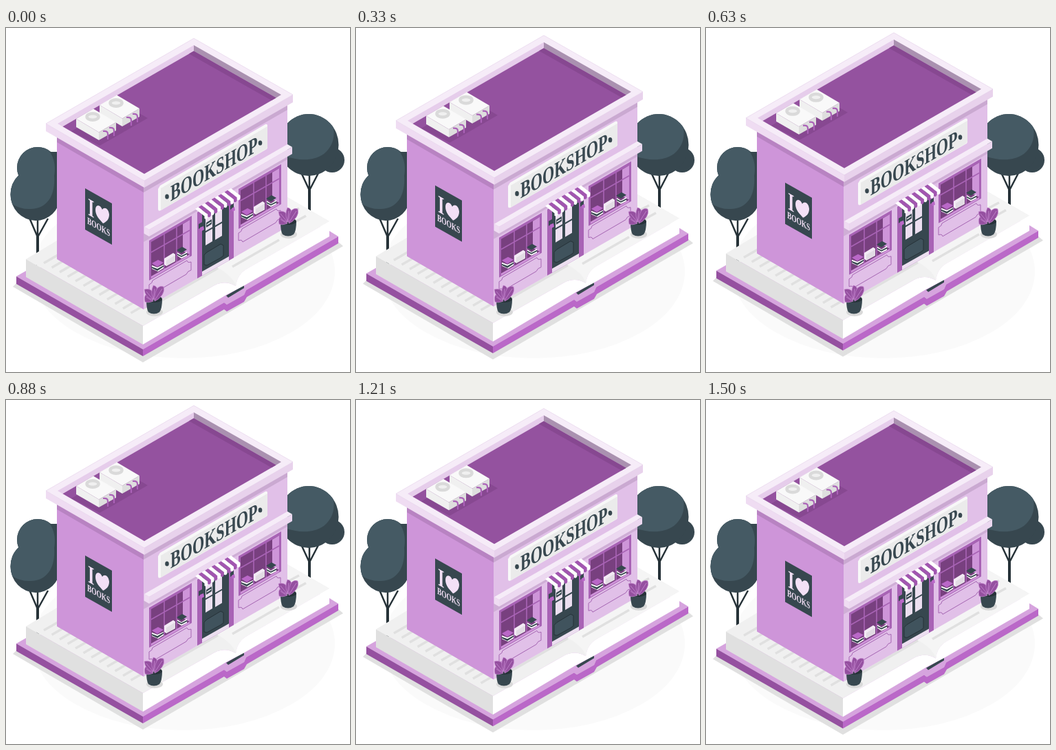
An HTML page that plays this animation: 500x500 px, repeating every 1.54 s.

```html
<!DOCTYPE html>
<html lang="en">
<head>
<meta charset="utf-8">
<title>Bookshop</title>
<style>
  html, body { margin: 0; width: 100%; height: 100%; overflow: hidden; background: #fff; }
  svg { display: block; width: 100%; height: 100%; }
  text { font-family: "Liberation Serif", serif; font-weight: bold; }
  .dark { fill: #37474f; }
  .leafy { fill: #455a64; }
  .branch { fill: none; stroke: #263238; stroke-width: 2.5; }
  .trunk { stroke: #263238; stroke-width: 4; }
  .line { fill: none; stroke: #a565b2; stroke-width: 1; }
</style>
</head>
<body>
<svg viewBox="0 0 500 500">
  <defs>
    <clipPath id="leftCrown">
      <circle cx="46" cy="203" r="30"/>
      <ellipse cx="43" cy="242" rx="36.500" ry="38"/>
      <path d="M60 180H80V245H60Z"/>
    </clipPath>
    <clipPath id="rightCrown"><ellipse cx="440" cy="170" rx="43.500" ry="45"/></clipPath>
    <g id="plant">
      <ellipse cx="216" cy="413" rx="12" ry="6" fill="#d9d9d9"/>
      <path class="dark" d="M204 394Q204 409 207 413Q215 418 223 413Q227 408 227 394Z"/>
      <ellipse cx="215.500" cy="394" rx="11.500" ry="5" fill="#263238"/>
      <g fill="#9550a0" stroke="#ce93d8" stroke-width=".6">
        <path d="M214 397Q206 400 202 398Q200 390 204 387Q212 388 214 397Z"/>
        <path d="M214 395Q202 392 201 380Q208 378 212 382Q215 388 214 395Z"/>
        <path d="M215 395Q209 385 214 374Q221 375 220 384Q219 391 215 395Z"/>
        <path d="M216 397Q215 386 220 378Q224 374 229 376Q231 382 227 388Q222 395 216 397Z"/>
      </g>
      <path d="M204 383L214 395L216 379M216 396L227 379M204 391L213 397" fill="none" stroke="#ce93d8" stroke-width=".7"/>
    </g>
    <g id="window">
      <path d="M208 309L270 273V331L208 367Z" fill="#a863b5"/>
      <path d="M211 311L267 279V329L211 361Z" fill="#78407f"/>
      <path d="M257 285L267 279V329L257 324Z" fill="#ce95d9"/>
      <path d="M230 299V350M248 289V340M211 326L267 294" fill="none" stroke="#a863b5" stroke-width="1.600"/>
      <path d="M211 361L267 329V332L211 364Z" fill="#ce93d8"/>
      <path d="M212 350L221 354L229 349V344L220 348L212 345Z" fill="#fff"/>
      <path d="M212 342L221 337L229 341L220 347Z" fill="#ba68c8"/>
      <path class="dark" d="M212 347L220 350L229 345V347L220 353L212 349Z"/>
      <path d="M230 335L243 327L246 329V339L233 346L230 344Z" fill="#f3eaf5"/>
      <path d="M233 338L246 330V339L233 346Z" fill="#e2dbe4"/>
      <path d="M249 326L255 330L263 325V331L255 335L249 331Z" fill="#fff"/>
      <path class="dark" d="M248 323L256 318L263 322L255 327ZM249 328L255 331L263 327V329L255 333L249 330Z"/>
      <path class="line" d="M213 367L263 338Q264 342 269 340V352Q264 353 262 358L214 386Q213 382 208 384V373Q213 371 213 367Z"/>
    </g>
    <g id="unit">
      <path d="M102 132L127 117.500L160 137L135 151.500Z" fill="#f9f9f9"/>
      <path d="M102 132L135 151.500V163L102 144Z" fill="#f0f0f0"/>
      <path d="M135 151.500L160 137V149L135 163Z" fill="#dedede"/>
      <ellipse cx="126" cy="129" rx="8.500" ry="4.800" fill="#f0f0f0" stroke="#dadada" stroke-width="4.500"/>
      <path d="M141 150Q148 149 148 154V162M150 145Q157 144 157 149V157" fill="none" stroke="#ab62b8" stroke-width="2.200"/>
    </g>
  </defs>

  <ellipse cx="258" cy="354" rx="220" ry="126" fill="#fafafa"/>

  <g id="trees">
    <path class="branch" d="M34 276L46 304L61 277M46 276V302"/>
    <path class="trunk" d="M46 300V345"/>
    <g clip-path="url(#leftCrown)">
      <path class="dark" d="M0 170H85V285H0Z"/>
      <path class="leafy" d="M0 170H54C69 182 73 197 70 215C72 240 62 263 36 263Q22 264 9 256H0Z"/>
    </g>
    <path class="branch" d="M428 208L441 236L455 209M441 210V236"/>
    <path class="trunk" d="M441 232V275"/>
    <circle class="dark" cx="474" cy="192" r="18"/>
    <g clip-path="url(#rightCrown)">
      <path class="dark" d="M390 120H490V220H390Z"/>
      <path class="leafy" d="M390 120H468C482 150 478 170 462 183C446 194 425 193 405 186H390Z"/>
    </g>
  </g>

  <g id="shop">
    <!-- open book -->
    <path d="M10 376L199 486L490 317L483 311L199 470L15 371Z" fill="#e0e0e0"/>
    <path d="M15 361L29 353L409 265L470 295L483 303L349 381L346 388L321 402L317 399L199 467Z" fill="#d6a4de"/>
    <path d="M15 361L199 467V477L15 372Z" fill="#9550a0"/>
    <path d="M199 467L317 399L321 402L346 388L349 381L483 303V313L350 391L346 398L321 412L317 409L199 477Z" fill="#ba68c8"/>
    <path class="dark" d="M320 389L346 374V378L323 392Z"/>
    <path d="M29 336L74 309L409 246L470 281L350 350Q336 358 334 375Q319 366 303 374L199 433Z" fill="#f0f0f0"/>
    <path d="M302 345L409 246L470 281L350 350Q336 358 334 375Q330 360 302 345Z" fill="#f5f5f5"/>
    <path d="M29 336L199 433V460L29 362Z" fill="#e0e0e0"/>
    <path d="M199 433L303 374Q319 366 334 375Q336 358 350 350L470 281V303L345 375L320 388L199 460Z" fill="#fff"/>
    <path id="lines" fill="none" stroke="#e0e0e0" stroke-width="3.500"/>

    <!-- walls -->
    <path d="M74 150L200 222V409L74 336Z" fill="#ce95d9"/>
    <path d="M200 222L409 102V289L200 409Z" fill="#e1c0e8"/>
    <path d="M74 158L200 231V239L74 166Z" fill="#b883c2"/>
    <path d="M200 231L409 111V119L200 239Z" fill="#caa9d1"/>

    <!-- roof -->
    <path d="M58 139L201 222V232L58 150Z" fill="#efdcf2"/>
    <path d="M201 222L417 97V108L201 232Z" fill="#e8d2ec"/>
    <path d="M58 139L273 15L417 97L201 222Z" fill="#f6ecf8" stroke="#dfc7e4" stroke-width=".5"/>
    <path d="M75 139L273 25V33.500L82.400 143.300Z" fill="#e6cdeb"/>
    <path d="M273 25L400 97L392.600 101.500L273 33.500Z" fill="#aa91b0"/>
    <path d="M82.400 143.300L273 33.500L392.600 101.500L201 212Z" fill="#94529f"/>
    <path d="M273 33.500L392.600 101.500L386 105.300L266 37.500Z" fill="#874891"/>
    <path d="M95 150L120 136L180 116L206 131L154 161L136 171Z" fill="#874891"/>
    <use href="#unit" x="34" y="-20"/>
    <use href="#unit"/>

    <!-- poster -->
    <path class="dark" d="M115 233L154 255V315L115 293Z"/>
    <g fill="#f3e0f6">
      <text transform="matrix(.67 .387 0 1 119 271)" font-size="36">I</text>
      <text transform="matrix(.67 .387 0 1 118 284)" font-size="14">BOOKS</text>
      <path d="M140 264C137 256 130 256 130 264C130 273 136 278 141 284C146 282 150 278 150 271C149 261 142 260 140 264Z"/>
    </g>

    <!-- sign -->
    <path d="M224 229L377 140Q380 139 380 142V174L379 176L225 265Q221 267 221 263V234Z" fill="#f8f8f8"/>
    <path d="M225 233L380 143V173L378 176L225 265Z" fill="#ebebeb"/>
    <text class="dark" transform="matrix(.67 -.387 0 1 239 252)" font-size="33">BOOKSHOP</text>
    <ellipse class="dark" cx="234" cy="245" rx="2.800" ry="3.600"/>
    <ellipse class="dark" cx="369.500" cy="167" rx="2.800" ry="3.600"/>

    <!-- ledge -->
    <path d="M200 299L409 180V191L200 311Z" fill="#cfaed6"/>
    <path d="M201 289L409 169L416 173L208 293Z" fill="#f6ecf8"/>
    <path d="M201 289L208 293V303L201 299Z" fill="#efdcf2"/>
    <path d="M208 293L416 173V183L208 303Z" fill="#ecd8f0"/>

    <use href="#window"/>
    <use href="#window" x="130" y="-75"/>

    <!-- door -->
    <path d="M278 268L331 238V334L278 364Z" fill="#a863b5"/>
    <path d="M285 262L324 240V338L285 360Z" fill="#ecdff0"/>
    <path class="dark" d="M285 262L324 240V332L285 354Z"/>
    <path d="M290 270L300 264V310L290 316ZM304 262L314 256V302L304 308Z" fill="#ecdff0"/>
    <path d="M289 297L315 282" stroke="#37474f" stroke-width="2"/>
    <path d="M292 326L312 314L316 316V331L312 334L292 345L288 344V330Z" fill="#40535d" stroke="#263238"/>
    <path class="dark" d="M291 283L299 278V285L291 290Z"/>
    <path d="M292 286L298 282" stroke="#fff" stroke-width="1.300"/>
    <path d="M280 285L287 281V288L280 292ZM326 258L331 255V261L326 264Z" class="dark"/>
    <path d="M282 290L287 288L288 293L283 296ZM328 262L332 260L333 265L329 267Z" fill="#ba68c8"/>

    <!-- awning -->
    <g id="awning"></g>
  </g>

  <use href="#plant" x="195" y="-113"/>
  <use href="#plant"/>
</svg>
<script>
  const byId = id => document.getElementById(id);

  // Printed lines on the book pages
  let lines = "M216 402L308 349M329 347L397 308M418 283L436 273M411 270L426 262";
  for (let i = 0; i < 12; i++) lines += `M${55 + i * 11.5} ${341.7 + i * 6.6}l30 -17.3`;
  byId("lines").setAttribute("d", lines);

  // Striped awning with a scalloped edge
  const stripes = 11, dx = 52 / stripes, dy = -30 / stripes;
  let awning = "";
  for (let i = 0; i < stripes; i++) {
    const x = 275 + i * dx, y = 263 + i * dy;
    awning += `<path fill="${i % 2 ? "#a256b0" : "#fff"}" d="M${x} ${y}l${dx} ${dy}l13.5 10.5v3.5q-1 5 -${dx} ${-dy}v-3.5Z"/>`;
  }
  byId("awning").innerHTML = awning;

  const period = 1540, half = period / 2, peak = 710, lift = 10;
  const shop = byId("shop");

  function draw(now) {
    const fromPeak = Math.abs((now - peak + period + half) % period - half);
    const y = (fromPeak - peak) / half * lift;
    shop.setAttribute("transform", `translate(0 ${y.toFixed(3)})`);
    requestAnimationFrame(() => draw(performance.now()));
  }
  draw(0);
</script>
</body>
</html>
```
